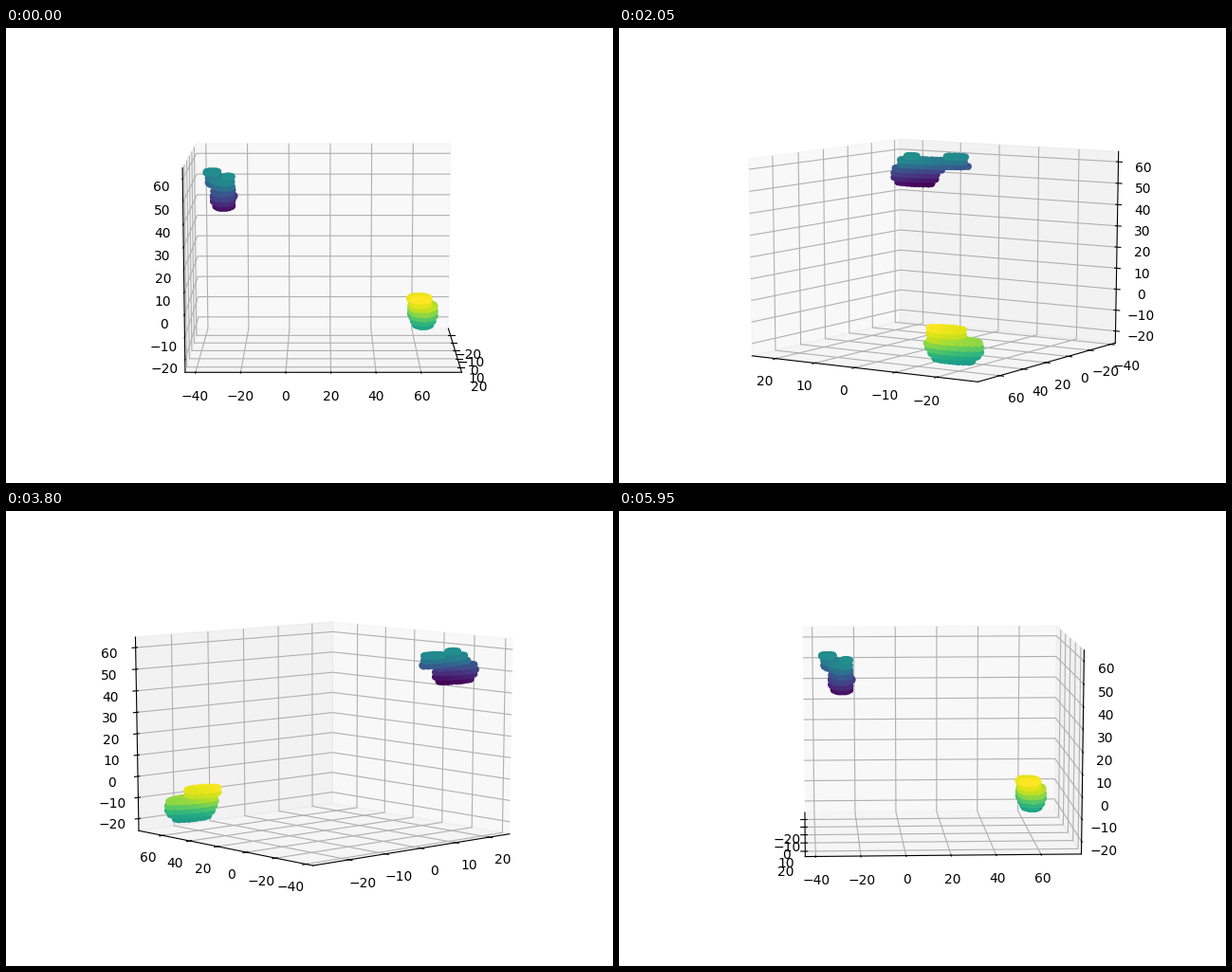
A matplotlib script for the animation above (6000 ms loop, 640 px wide and 480 px high).

```python
import numpy as np
import matplotlib.pyplot as plt
from matplotlib.animation import FuncAnimation

FRAMES, INTERVAL = 120, 50
LAYERS, GAP = 7, 2.17  # layers per blob and their spacing

GX, GY = np.meshgrid(np.arange(-27, 24), np.arange(-37, 72), indexing="ij")


def ellipsoid(center, radii, shear=0):
    """Return a test for the grid points inside at height z."""
    (cx, cy, cz), (rx, ry, rz) = center, radii

    def inside(z):
        dx = GX - cx
        dy = GY - cy - shear * dx
        return (dx / rx) ** 2 + (dy / ry) ** 2 + ((z - cz) / rz) ** 2 <= 1

    return inside


core = ellipsoid((17, -27.6, 50), (5.8, 4.8, 6.4))
slab = ellipsoid((12.9, -29.7, 55.6), (8.3, 4.6, 3.2), shear=0.5)
horns = [ellipsoid((8.2, -33.6, 59), (2.8, 3, 2.2)),
         ellipsoid((17.2, -25.5, 59), (1.8, 2, 2.2))]
body = ellipsoid((-20.1, 64.5, -14), (6.4, 6.1, 8.5))
cap = ellipsoid((-17.7, 62.8, -8), (4.2, 4.9, 6))


def upper(z):
    crown = horns[0](z) | horns[1](z)
    return crown if z > 58 else core(z) | slab(z)


def lower(z):
    return cap(z) if z > -10 else body(z) | cap(z)


def draw_blob(shape, base, shades):
    """Scatter the layers from the bottom up, coloured in point order."""
    heights = base + GAP * np.arange(LAYERS)
    masks = [shape(z) for z in heights]
    counts = [m.sum() for m in masks]
    ramp = plt.cm.viridis(np.linspace(*shades, sum(counts)))
    parts = np.split(ramp, np.cumsum(counts)[:-1])
    for k, (z, m, colors) in enumerate(zip(heights, masks, parts)):
        ax.scatter(GX[m], GY[m], np.full(m.sum(), z), s=20, c=colors,
                   depthshade=False, zorder=5 + k)


fig = plt.figure(figsize=(6.4, 4.8), dpi=100)
ax = fig.add_subplot(projection="3d", computed_zorder=False)
# Fill the whole subplot area with a unit cube instead of a square view
ax.apply_aspect = lambda position=None: None
ax.set_box_aspect((1, 1, 1), zoom=3 ** 0.5 / 1.8294640721620434)

draw_blob(upper, 46, (0, 0.5))
draw_blob(lower, -20, (0.54, 1))

ax.set_xticks(range(-20, 21, 10))
ax.set_yticks(range(-40, 61, 20))
ax.set_zticks(range(-20, 61, 10))
ax.set_xlim(-29.65, 26.15)
ax.set_ylim(-44.6, 78)
ax.set_zlim(-25.75, 64.8)


def update(i):
    # The tiny offset settles which wall shows at right angles
    ax.view_init(elev=10, azim=abs(360 * i / FRAMES - 1e-3))
    return []


anim = FuncAnimation(fig, update, frames=FRAMES, interval=INTERVAL,
                     init_func=lambda: update(0), repeat=True,
                     repeat_delay=0, blit=False)
plt.show()
```
